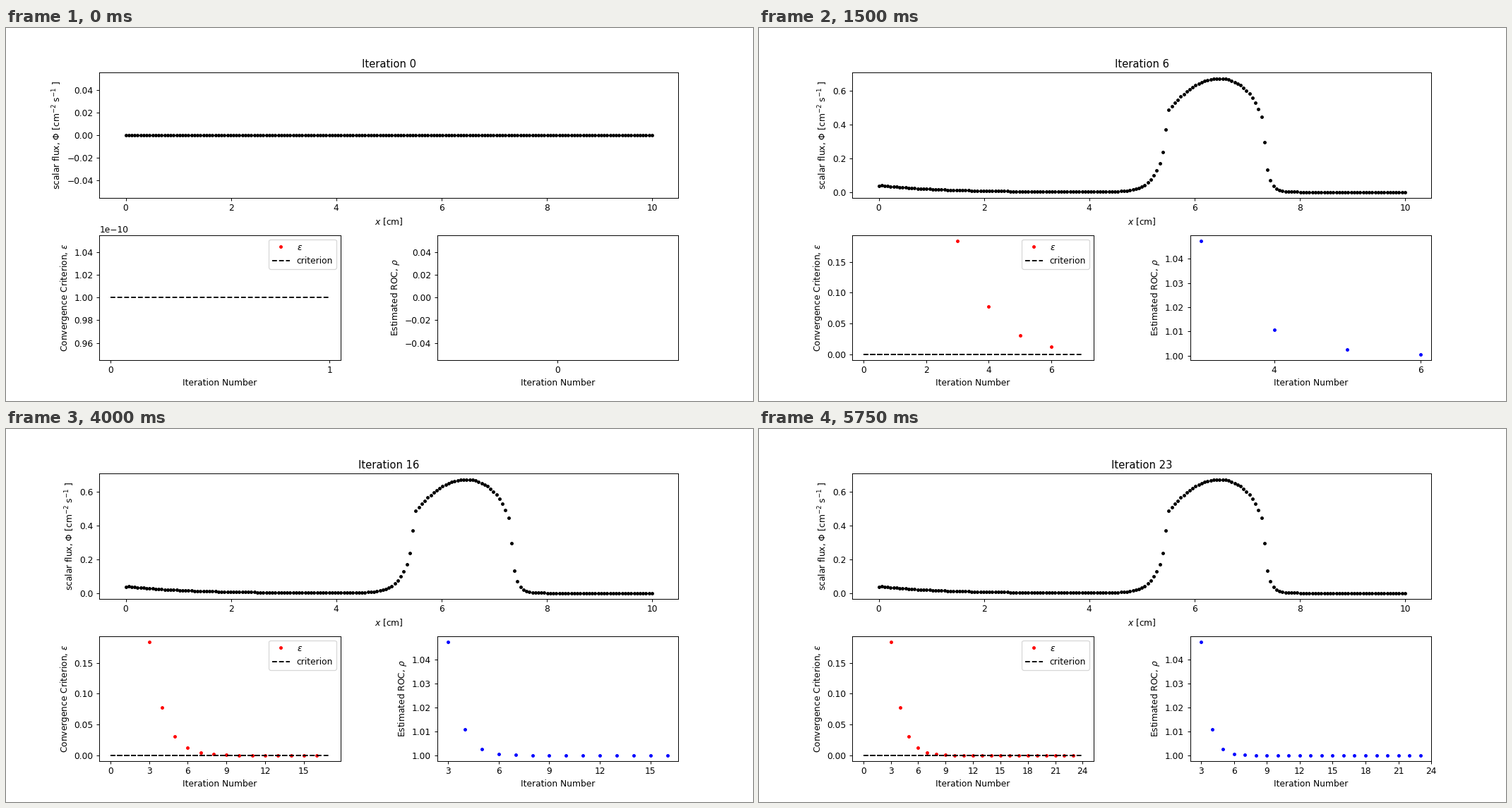
Recreate the animation shown at these times as a matplotlib script. Size 1058 px wide and 529 px high, loop 6000 ms.

```python
import numpy as np
import matplotlib.pyplot as plt
from matplotlib.animation import FuncAnimation
from matplotlib.ticker import MultipleLocator

WIDTH, HEIGHT = 1058, 529
DPI = WIDTH / 12
STEPS = 24
CELLS = 176
SLAB_START, PEAK, SLAB_END = 97, 114, 128   # edge indices of the bright slab
FIRST = 3                                   # first iteration with an estimate
CRITERION = 1e-10

plt.rcParams["font.family"] = "DejaVu Sans"


def flank(depth, slow, slow_rate, fast, fast_rate):
    """Attenuation outside the slab: a fast and a slow exponential."""
    depth = np.maximum(depth, 0)
    return slow * np.exp(-slow_rate * depth) + fast * np.exp(-fast_rate * depth)


def converged_flux():
    i = np.arange(CELLS + 1)
    x = 10 * i / CELLS

    # parabolic dome that falls faster towards the right edge
    d = i - PEAK
    bend = np.where(d < 0, 6.4e-4, 8.3e-4 + 3.3e-4 * (d / (SLAB_END - PEAK)) ** 4)
    dome = .6735 - bend * d ** 2

    left = flank(SLAB_START - i, .39, .28, .43, 1.75) + .0405 * np.exp(-.9 * x)
    left[0] *= .9   # vacuum boundary
    right = flank(i - SLAB_END, .454, .64, .45, 2.1)
    return x, np.select([i < SLAB_START, i > SLAB_END], [left, right], dome)


def amplitude(n):
    """Share of the converged flux reached after n iterations."""
    return np.where(n > 0, 1 - .014 * .239 ** (n - 3.0), 0)


def epsilon(n):
    k = n - FIRST
    return .1845 * .42 ** k * .953 ** (k * (k - 1) / 2)


def rate(n):
    return amplitude(n) / amplitude(n - 1)


x, flux = converged_flux()

fig = plt.figure(figsize=(WIDTH / DPI, HEIGHT / DPI), dpi=DPI)
grid = fig.add_gridspec(2, 2, wspace=.4, hspace=.3)
top = fig.add_subplot(grid[0, :])
low_left = fig.add_subplot(grid[1, 0])
low_right = fig.add_subplot(grid[1, 1])


def update(n):
    for ax in (top, low_left, low_right):
        ax.clear()
    done = np.arange(FIRST, n + 1)

    top.plot(x, amplitude(n) * flux, "k.")
    top.set_title(f"Iteration {n}")
    top.set_xlabel("$x$ [cm]")
    top.set_ylabel(r"scalar flux, $\Phi$ [cm$^{-2}$ s$^{-1}$ ]")

    low_left.plot(done, epsilon(done), "r.", label=r"$\varepsilon$")
    # one more criterion line is laid over the others at every iteration
    for k in range(n + 1):
        low_left.plot([0, k + 1], [CRITERION] * 2, "k--",
                      label="criterion" if k == 0 else None)
    low_left.set_ylabel(r"Convergence Criterion, $\varepsilon$")
    low_left.legend(loc="best")

    low_right.plot(done, rate(done), "b.")
    low_right.set_ylabel(r"Estimated ROC, $\rho$")

    for ax in (low_left, low_right):
        ax.set_xlabel("Iteration Number")
        ax.xaxis.set_major_locator(MultipleLocator(1 + (n + 3) // 9))


anim = FuncAnimation(fig, update, frames=STEPS, interval=250,
                     repeat=True, repeat_delay=0)
plt.show()
```
